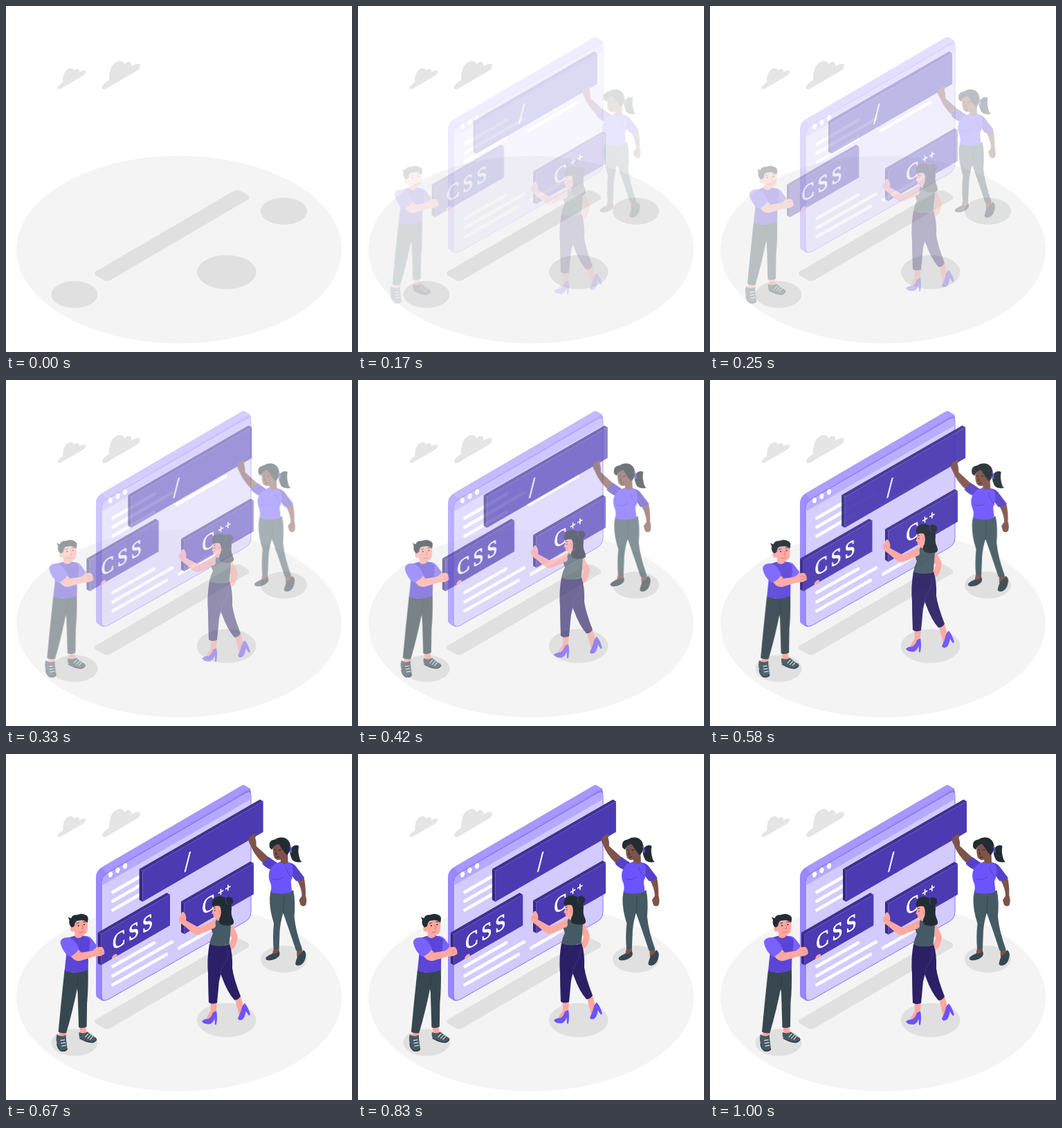
Animation of 500x500 px, one loop 1040 ms. Source, as an HTML page:

```html
<!DOCTYPE html>
<html lang="en">
<head>
<meta charset="utf-8">
<title>Code panels</title>
<style>
html, body { margin: 0; width: 100%; height: 100%; overflow: hidden; background: #fff; }
svg { display: block; width: 100vw; height: 100vh; }
.floor { fill: #f4f4f4; }
.shadow { fill: #e0e0e0; }
.cloud { fill: #e5e5e5; }
.main { fill: #6c54fc; }
.deep { fill: #5a45d8; }
.light { fill: #7963fc; }
.sleeve { fill: #5641c6; }
.night { fill: #2b2065; }
.dark { fill: #37474f; }
.grey { fill: #455a64; }
.hair { fill: #222d33; }
.skin { fill: #ffa8a0; }
.brown { fill: #7e5349; }
.line { fill: none; stroke-linecap: round; stroke-linejoin: round; }
.code { stroke: #fff; stroke-width: 4.6; }
.fold { stroke: #263238; stroke-width: .7; opacity: .6; }
text { font-family: "Liberation Serif", "Times New Roman", serif; fill: #fff; stroke: #fff; stroke-width: 1; }
</style>
</head>
<body>
<svg viewBox="0 0 500 500">
  <ellipse class="floor" cx="250" cy="352" rx="235" ry="135.5"/>
  <g class="shadow">
    <ellipse cx="99" cy="417" rx="33.5" ry="19.5"/>
    <ellipse cx="401.5" cy="296.5" rx="33.5" ry="19.5"/>
    <ellipse cx="318.7" cy="384.5" rx="42.8" ry="24.6"/>
    <path d="M130 383.500L328 268Q334 264.800 340 267.800L349 273Q352.500 276 350 279.500L152 395.500Q146.500 398.500 140 395.500L130 389.500Q126 387 130 383.500Z"/>
  </g>
  <g class="cloud">
    <path id="puff" d="M75 116.500Q73.500 120.500 78 120L112.500 100Q116 97 114.800 93.200Q111 92.500 106 96Q106.500 90.500 102 91.200Q99.500 92 98.500 93.500Q97 89 91.500 90.200Q82 93.500 82 110.500Q76 114 75 116.500Z"/>
    <use href="#puff" transform="translate(37.700 -43) scale(1.355 1.36)"/>
  </g>

  <!-- Browser window -->
  <g data-move="none">
    <path fill="#9887fd" d="M130 178Q130 169 138 164L341 45.500Q343 44.500 345 45.500L352 49.500Q354 51 354 54L354 200L142 356.500Q139 357 137 355.500L131.500 351.500Q130 350 130 347Z"/>
    <path fill="#a797fe" d="M138 164L341 45.500Q343 44.500 345 45.500L352 50L145 172Z"/>
    <path fill="#d3cbfe" stroke="#6c54fc" stroke-width=".8" d="M138 188Q138 177 146 172.500L346 56.500Q354 52 354 60L354 228Q354 237 346 242L148 354.500Q138 359.500 138 349Z"/>
    <path fill="#b5a9fe" d="M138.400 190V188Q138.400 177.400 146 173L346 57Q353.600 52.800 353.600 60V65.500Z"/>
    <g fill="#fff">
      <ellipse id="dot" cx="151" cy="174" rx="2.9" ry="4.1" transform="rotate(14 151 174)"/>
      <use href="#dot" x="10.500" y="-6"/>
      <use href="#dot" x="21" y="-12.200"/>
    </g>
    <path class="line code" d="M154.500 199.500L215 164.500M154.500 212.500L240 163M154.500 225.500L214 191M247 180L318 139M154.500 307L214 273M154.500 320.500L240 271.500M154.500 333.500L232 289.500M250 280.500L312 245"/>
  </g>

  <!-- Top panel and the woman on the right -->
  <g data-move="x">
    <g data-panel="192 166.300 174.300"></g>
    <text transform="matrix(.866 -.5 0 1 257.500 170)" font-size="36">/</text>
    <g class="brown">
      <path d="M379 149.500L361 133Q361.500 126 359.500 121Q361.500 118 359 115L351 120.500Q348.500 126 352 130.500Q358 146 371 158Z"/>
      <path d="M420 182L430 178Q433 192 432.300 204.500Q435 212 432.500 218.500Q428.500 221.500 425 218L423 211L427 205Q427 195 420 182Z"/>
      <path d="M386 281H394V289L384 292ZM419.500 283L427 281.500L429 289L420 294Z"/>
    </g>
    <path class="grey" d="M384 199Q405 204 414.500 196.500Q418 212 416 235Q418 256 427.500 282Q423 286 418.500 284Q410 258 400 230Z"/>
    <path class="grey" d="M382 197Q392 203 404 201L400.500 228Q396 242 395 255L394 281Q390 283.500 386 281Q384.500 262 386.500 245Q380 225 380.500 208Z"/>
    <path class="line fold" d="M401 205Q401 218 400 230"/>
    <g class="dark">
      <path d="M375 294Q380 290 385 288Q390 290 394 284.500Q396.500 291 392 294Q384 299.500 377 298Q374 297 375 294Z"/>
      <path d="M417.500 303Q418.500 297 421.500 291Q427 289 429 283Q434 286 432.500 293Q431 302 425 305Q418.500 307 417.500 303Z"/>
    </g>
    <path class="sleeve" d="M391 157L378.500 148.500L369.500 158.500Q376 166 387 169Z"/>
    <path class="sleeve" d="M404 156Q414 157 418 162L430.500 178.500Q427 184 418.500 183.500Q408 172 404 156Z"/>
    <path class="main" d="M387 159Q393 157 397 155L406 156Q413 158 414 165Q414.500 176 411 184L412.500 198Q403 205 382 200Q384 190 380.500 184Q377 174 382 165Z"/>
    <path class="line" stroke="#4b3ab1" stroke-width=".8" d="M384 180Q392 184 400 178M404 164Q406 172 413 180"/>
    <path class="hair" d="M410 138Q416 129 422.500 133Q421 141 423 148Q424 154 427 156Q414 158 411.500 149.500Q409 143 410 138Z"/>
    <path class="brown" d="M385.500 131Q384.500 144 387 149.500Q391 155 396 152.500L396.500 156.500Q402 161 407 156.500L406 132Q396 124 385.500 131Z"/>
    <path class="hair" d="M380.500 135.500Q378 124.500 388 123.500Q395 118.500 404 122Q411.500 127 410.500 137Q409 143 405.500 146.500L401.500 142Q398 137 393.500 130Q386 131 384 138.500Z"/>
    <path class="line" stroke="#6c54fc" stroke-width="2" d="M410 133.500Q412 137 411.500 142"/>
    <path class="line" stroke="#2b1d1b" stroke-width=".9" d="M387 138.500L389.500 139M393.500 139L397 138.500M390 142L389 145L391 145.500M390 149.500Q392 150 394 148.500"/>
  </g>

  <!-- Left panel and the man -->
  <g data-move="x">
    <path class="skin" d="M119 279L131 276L135 285L121 288Z"/>
    <g data-panel="132 258 99.700"></g>
    <text transform="matrix(.866 -.5 0 1 153.500 284)" font-size="31.500" letter-spacing="5.500">CSS</text>
    <path class="skin" d="M152.500 294Q155 289 159 288.800Q161 291 158.500 294Q155 296.500 152.500 296Z"/>
    <path class="skin" d="M76.500 400L87 401L85.500 411L76 409ZM105.500 393H114.500L116 404L107 405Z"/>
    <path class="dark" d="M98 315L118 310Q118.500 340 116.500 360L116 394Q110 397.500 104.500 395L103 345Z"/>
    <path class="dark" d="M84 312Q98 318 106 315L103 335Q96 371 86.500 403Q80 404.500 75 401.500L79 360Z"/>
    <path class="line fold" d="M104 320Q103 328 103 336"/>
    <g class="grey">
      <path d="M73 405Q71 412 73 418Q74 428 80 429.500Q88 430 88 425Q86 413 86 406Q79 410 73 405Z"/>
      <path d="M105 402Q104 409 107 411Q117 417 124 417Q131 415.500 130 410.500Q123 407 117 401.500Q111 405 105 402Z"/>
    </g>
    <path class="line" stroke="#fff" stroke-width="1.100" d="M78.500 414L84 413M79 418L85 417M80 422L86 421M114 409L118 404.500M117.500 411L121.500 406.500M121 412.500L124.500 408.500"/>
    <path class="line" stroke="#263238" stroke-width="1.200" d="M73 419Q74.500 428 80 429.200Q87 429.500 87.800 426M106 411Q117 417 124 416.800Q129 415.500 130 412.500"/>
    <path class="light" d="M109 263Q120 262 124 268L131 277.500Q128 284 119 286Z"/>
    <path class="deep" d="M88 266Q97 263 101 262L109 262Q117 264 121 268Q121 280 118.500 290L118 312Q101 319 84 313.500L86.500 290L81 275Z"/>
    <path class="skin" d="M91 289Q97 300 106 299L128 292.500Q136 293 141.500 289Q142.500 284 138.500 279L133 278.800Q131 283 124 284.500L108 287L102 280Z"/>
    <path class="line" stroke="#eb857f" stroke-width=".8" d="M133 284L139 284M134 288L140.500 287M105 287L109 287"/>
    <path class="light" d="M89 265Q78 265 78 273Q80 284 90.500 293Q99 291 105 281.500Q98 266 89 265Z"/>
    <path class="skin" d="M99 255V264Q104 268 109.500 264V257Z"/>
    <path class="skin" d="M96.500 243L117 239Q118 250 116.500 257Q113 263 106 262Q99 261 97 255Z"/>
    <ellipse class="skin" cx="95.500" cy="252.500" rx="3" ry="4.200"/>
    <path class="hair" d="M94 250.500Q89.500 246 91 240L89 235.500L93.500 237.500Q95 232 102 232.500Q110 229 116 233.500L118 236Q118.500 240 117 244Q113 239 105 240.800Q99 240.500 98.500 248L96.500 250Z"/>
    <g class="hair"><circle cx="104" cy="248" r="1.100"/><circle cx="112.500" cy="246.500" r="1.100"/></g>
    <path class="line" stroke="#263238" stroke-width=".9" d="M101.500 245L105 243.800M111 242.800L114.500 242.500"/>
    <path class="line" stroke="#d9655f" stroke-width=".9" d="M109 247L111 252L108.800 252.800M105 257.500Q108.500 258.500 111.500 256.500"/>
  </g>

  <!-- Right panel and the woman in front -->
  <g data-move="y">
    <g data-panel="253 213.700 100.300"></g>
    <text transform="matrix(.866 -.5 0 1 283.500 233.500)" font-size="31.500">C</text>
    <text transform="matrix(.866 -.5 0 1 306.500 207.600)" font-size="16.500" letter-spacing="2.500" stroke-width=".5">++</text>
    <g class="skin">
      <path d="M295.500 358L305 359L303.500 375L298 378L294 385L288 387Q290 380 296 372ZM330.500 353L339 350.500L342.500 363L344 371L337 379Z"/>
      <path d="M306 237Q300 240 294 244L278 251L260 241Q261.500 234 257 229Q253 228 253 234Q248 236.500 250 242Q254 247 258 249L269.500 259Q275 263.500 281 260.500L300 253L308 250Z"/>
      <path d="M320 246Q326 245 328.500 250Q333 257 335 264Q334 273 330 280L324 285L321 280L326 266L320 256Z"/>
    </g>
    <path class="night" d="M300 276Q315 280 323 275Q328 290 327 310Q329 325 339 350.500Q336 356 330 356Q320 345 312 323Q303 305 300 276Z"/>
    <path class="night" d="M294 274.500Q306 280 314 277Q316 300 308 328L305 360Q298 363 293 359.500Q292 335 292 318Q290 298 294 274.500Z"/>
    <path class="line" stroke="#4b3ab1" stroke-width=".6" d="M321 284Q322 298 312 309Q310 320 308 328"/>
    <g class="main">
      <path d="M283 386.500Q287 383 292 383.500Q297 381 299 374L304 371.500Q306 380 304 391.500H302L301.500 382Q300 389 294 391Q285 391 283 386.500Z"/>
      <path d="M335 382.500Q338 377 340 370Q341 364 345 360.500Q350 366 353 377L351 378.500L346.500 372Q346 380 342 384Q336 387 335 382.500Z"/>
    </g>
    <path class="grey" d="M306 237Q301.500 242 303 249Q302 253 297 253Q297 257 299 260Q295 268 294 275.500Q308 281 322.500 275.500L324 262L325 246Q318 239 306 237Z"/>
    <path class="skin" d="M299.500 220Q299.500 226 297.500 231L299.500 232Q299.500 237.500 304 237.500L305 241L312 242L317 222L306 217Z"/>
    <path class="hair" d="M299 222Q295.500 215 301 209Q308 204 316 208Q326 211 326 224Q324.500 232 328 239Q331 246 326 247.500Q316 250 309 246Q306 241 310 235Q312 226 309 220.500Q304 218.500 299 222Z"/>
    <circle class="hair" cx="322.300" cy="213" r="5.900"/>
    <path class="line" stroke="#4b3ab1" stroke-width="1" d="M317.500 210Q316.500 215 320 218"/>
    <path class="line" stroke="#263238" stroke-width=".9" d="M300.500 223.500L302.500 223M301 227L302.500 227"/>
    <path class="line" stroke="#eb857f" stroke-width=".8" d="M300 233.500L302.500 233M307 226Q309.500 226 308.500 230M253 236L256 240"/>
  </g>
</svg>
<script>
const LOOP = 1040, STEPS = 25, TRAVEL = 30;
const TAN30 = Math.tan(Math.PI / 6);
const movers = [...document.querySelectorAll('[data-move]')];

// Isometric slab: left side, top and front face
function slab(x, y, w) {
  const h = 44.5, dx = 4.7, dy = 2.7, rise = w * TAN30;
  const right = x + w, top = y - rise;
  return `<path fill="#36297f" d="M${x} ${y}l${dx} ${dy}v${h}l${-dx} ${-dy}z"/>
    <path fill="#3f3094" d="M${x} ${y}L${right} ${top}l${dx} ${dy}L${x + dx} ${y + dy}z"/>
    <path fill="#4b3ab1" d="M${x + dx} ${y + dy}L${right + dx} ${top + dy}v${h}L${x + dx} ${y + dy + h}z"/>
    <path class="line" stroke="#6f60c6" stroke-width=".5" d="M${x + dx} ${y + dy + h}v${-h}L${right + dx} ${top + dy}"/>`;
}
for (const g of document.querySelectorAll('[data-panel]')) {
  g.innerHTML = slab(...g.dataset.panel.split(' ').map(Number));
}

// cubic-bezier(.36, -.01, .5, 1.38), overshoots before settling
const curve = (a, b, s) => 3 * a * s * (1 - s) ** 2 + 3 * b * s * s * (1 - s) + s ** 3;
function ease(u) {
  let lo = 0, hi = 1;
  for (let i = 0; i < 24; i++) {
    const mid = (lo + hi) / 2;
    if (curve(.36, .5, mid) < u) lo = mid; else hi = mid;
  }
  return curve(-.01, 1.38, lo);
}

function draw(ms) {
  const step = Math.floor(ms / LOOP * STEPS + .1);
  const u = Math.min(1, (step * LOOP / STEPS + 40) / 1000);
  const p = step < 2 ? 0 : ease(u);
  const gap = (1 - p) * TRAVEL;
  for (const g of movers) {
    const [x, y] = { x: [-gap, 0], y: [0, gap], none: [0, 0] }[g.dataset.move];
    g.setAttribute('transform', `translate(${x.toFixed(2)} ${y.toFixed(2)})`);
    g.setAttribute('opacity', Math.max(0, Math.min(1, p)).toFixed(3));
  }
}

const start = performance.now();
function tick() {
  draw((performance.now() - start) % LOOP);
  requestAnimationFrame(tick);
}
tick();
</script>
</body>
</html>
```
